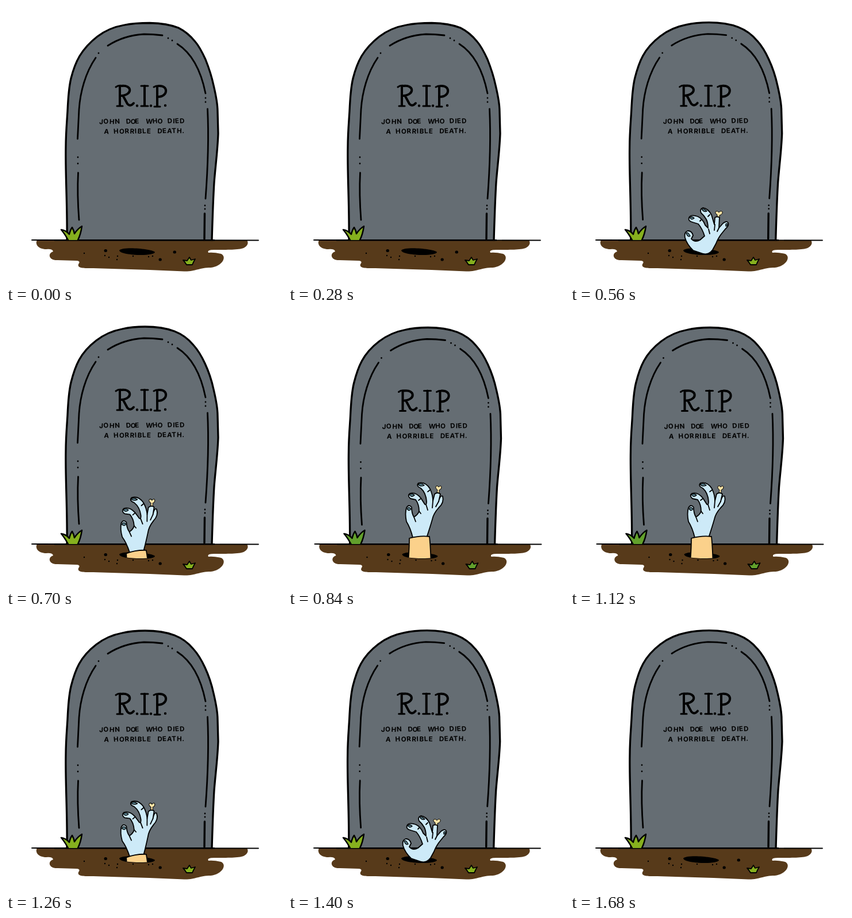
An HTML page for the animation above (1.82 s loop, 480 by 480 pixels).

```html
<!DOCTYPE html>
<html lang="en">
<head>
<meta charset="utf-8">
<title>Gravestone</title>
<style>
html, body { margin: 0; height: 100%; overflow: hidden; background: #fff; }
svg { display: block; width: 100vw; height: 100vh; }
.ink { fill: none; stroke: #000; stroke-width: 2.8; stroke-linecap: round; stroke-linejoin: round; }
.thin { stroke-width: 1.8; }
.dots { stroke-width: 2.8; }
#slab { fill: #656d73; stroke-width: 3.3; }
.skin { fill: #cdeaf8; }
.bone { fill: #fbe3a6; stroke-width: 1; }
.nail { fill: #5b8795; stroke-width: 1.3; }
text { font: 700 11.5px Inter, "Open Sans", sans-serif; }
</style>
</head>
<body>
<svg viewBox="0 0 480 480">
  <clipPath id="above"><path d="M0 0H480V427H259C257 435 199 433 197 425H0Z"/></clipPath>

  <g id="stone">
    <path id="slab" class="ink"/>
    <g class="ink">
      <path d="M156 90C138 116 129 150 127 180L124.5 231M125.5 290C124 318 125 346 127 372M177 69Q205 51 240 49Q256 49 272 51M298 66C323 82 339 112 347 152M350.5 179C353 232 351 282 347 335"/>
      <path d="M345.5 361L345 405" stroke-width="3.4"/>
      <path class="dots" d="M161 82l0 0M125 263l0 0M125 274l0 0M282 56l0 0M289 60l0 0M347 160l0 0M347 167l0 0M346 347l0 0M346 353l0 0"/>
    </g>
    <g class="ink" style="stroke-width:4">
      <path d="M198 140V173M201 139C219 137 221 154 201 156M204 157L211 170Q216 176 222 169M241 139V173M263 141V174M266 139C283 138 282 158 264 158"/>
      <path d="M228 173.5l0 0M252 173.5l0 0M277 173l0 0" stroke-width="4.4"/>
      <path d="M191 141Q196 137 203 139M193 174H203M235 139H247M235 174H247M257 141Q262 138 268 139M258 175H268" stroke-width="3"/>
    </g>
    <g transform="rotate(-.5 237 206)">
      <text y="204.5"><tspan x="162" letter-spacing="1.1" rotate="4 -5 3 -4">JOHN</tspan><tspan x="209" letter-spacing="-.8" rotate="-3 4 -3">DOE</tspan><tspan x="243" rotate="3 -4 2">WHO</tspan><tspan x="281" letter-spacing=".9" rotate="-4 2 -5 -2">DIED</tspan></text>
      <text y="221.5"><tspan x="170" rotate="4">A</tspan><tspan x="187" letter-spacing="1.1" rotate="-3 4 -4 3 -2 4 -3 2">HORRIBLE</tspan><tspan x="263" letter-spacing=".8" rotate="3 -4 3 -3 2 0">DEATH.</tspan></text>
    </g>
  </g>

  <g id="ground">
    <path fill="#573a1a" d="M54 407C50 414 56 423 70 423Q81 422 82 427C72 430 74 443 90 442L124 443Q130 444 126 449C123 457 139 456 152 456L250 459L310 461.5C329 462 336 455 356 455C376 453 385 436 374 431Q361 428 352 429Q349 424 362 424C385 424 405 424 413 421Q424 415 419 407Z"/>
    <path class="ink" style="stroke-width:1.8" d="M45 407L439 407.5"/>
    <path class="ink" style="stroke-width:2.6" d="M85 407.2L362 407.2"/>
    <path d="M197 425C202 418 253 422 259 428C258 436 198 434 197 425Z"/>
    <g class="ink" style="stroke-width:2.4">
      <path d="M136 430l0 0M172 434l0 0M179 437l0 0M194 435l0 0M193 441l0 0M221 435l0 0M248 436l0 0M255 435l0 0"/>
      <path style="stroke-width:5" d="M173 425.5l.5 0M268 441l.3 0"/>
      <path id="pebble" style="stroke-width:5" d="M293 428l.5 0"/>
    </g>
    <g id="grass" class="ink" style="stroke-width:2.5">
      <path d="M108 407Q102 396 96 389Q104 390 110 397Q112 389 115 385Q118 390 119 396Q125 387 132 383Q130 397 125 407"/>
      <path class="thin" d="M314 450Q311 445 308 442L315 443L319 437L322 442L329 440Q326 445 324 450Z"/>
    </g>
  </g>

  <g clip-path="url(#above)">
    <g id="low" class="ink thin">
      <path class="bone" d="M256 369L256 363Q251 360 254 357Q257 356 259 359Q262 355 265 358Q266 362 260 364L260 369Z"/>
      <path class="skin" d="M232 431L214 425Q203 414 200 403Q198 393 205 391Q212 391 214 399L211 405Q217 412 226 407L234 400Q230 387 223 379L213 376Q205 374 207 368Q210 362 222 366Q231 370 235 381L240 386Q240 377 237 371Q233 364 228 360Q225 353 231 351Q240 352 246 363L251 380L252 368Q256 365 260 368L259 386L266 378Q272 373 275 377Q277 382 270 388L262 398Q256 407 254 413L248 424Q241 433 232 431Z"/>
      <path d="M241 388L243 396M252 380L251 390M259 386L256 392M243 363L240 366M229 371L226 374"/>
      <path class="nail" d="M202 395Q205 392 209 400Q205 403 202 395ZM208 368Q213 365 216 369Q211 373 208 368ZM229 353Q234 352 238 357Q232 359 229 353ZM271 379Q275 377 274 381Q270 386 271 379Z"/>
    </g>
    <g id="high" class="ink thin">
      <path class="bone" d="M259 319L260 313Q255 309 258 306Q261 305 262 308Q266 304 267 308Q267 312 263 313L263 319Z"/>
      <path class="skin" d="M217 396Q213 379 206 368Q203 354 206 344Q210 337 215 343Q215 354 219 360Q226 356 228 350Q228 338 222 330L213 328Q207 323 212 319Q222 316 231 327L238 338Q241 340 241 333Q240 318 231 310Q222 306 227 301Q239 298 247 311Q252 322 252 332L255 320Q260 316 265 320L262 333Q265 321 269 324Q272 335 262 344Q253 354 251 364Q247 378 241 396Z"/>
      <path d="M240 338L243 348M252 332L251 344M228 350L231 354M262 333L257 342M219 360L222 368M247 313L243 316M231 328L227 331"/>
      <path class="nail" d="M207 346Q210 341 214 346Q211 351 207 346ZM211 321Q216 318 220 322Q215 327 211 321ZM226 303Q232 300 237 305Q230 308 226 303Z"/>
      <path fill="#fbd18b" d="M211 397Q229 392 246 394Q248 412 249 450H208Q211 420 211 397Z"/>
    </g>
  </g>
</svg>
<script>
const $ = id => document.getElementById(id);
const STEP = 140;
const order = [0, 1, 0, 2, 3, 4, 5, 6, 5, 4, 3, 2, 1];

// two slightly different drawings of the slab: only the crown changes
const slab = crown => "M106 408C107 350 103 290 104 245C104 222 106 200 107 183C108 160 109 143 113 126"
  + crown + "C353 108 358 124 361 138C365 155 368 168 368 183L369 222C368 252 364 280 362 307C360 340 359 375 358 408";
const slabs = [
  slab("C117 110 121 99 128 87C136 74 146 63 159 53C172 43 189 36 206 33C221 30 235 29.5 250 29.5C268 30 285 32 300 38C312 44 321 52 329 62C337 71 342 82 347 93"),
  slab("C117 110 121 98 127 87C134 74 144 63 157 53C170 43 186 36 202 33C215 30 228 29 242 29C260 29 277 31 293 37C306 42 317 50 326 61C335 71 341 82 346 93")
];

const OLIVE = "#86b01e", GREEN = "#62a02c";

// slab drawing, stone offset, ground offset, grass colour, hand transform
const poses = [
  { slab: 0, stone: [0, 0], ground: 0, grass: OLIVE },
  { slab: 1, stone: [0, -.3], ground: 0, grass: OLIVE },
  { slab: 1, stone: [0, -.3], ground: 0, grass: OLIVE, low: "translate(-1 40)" },
  { slab: 1, stone: [-.3, -.3], ground: 0, grass: OLIVE, low: "" },
  { slab: 1, stone: [0, 0], ground: 0, grass: OLIVE, high: "translate(-1 25) rotate(-4 229 410)" },
  { slab: 1, stone: [1.5, 1.5], ground: 1.5, grass: GREEN, high: "" },
  { slab: 1, stone: [1, 2], ground: 1, grass: GREEN, high: "translate(0 -2) rotate(2 229 425)" }
];

function show(id, transform) {
  const visible = transform !== undefined;
  $(id).style.display = visible ? "" : "none";
  if (visible) $(id).setAttribute("transform", transform);
}

function draw() {
  const pose = poses[order[Math.floor(performance.now() / STEP) % order.length]];
  const hand = pose.low ?? pose.high;
  $("slab").setAttribute("d", slabs[pose.slab]);
  $("grass").style.fill = pose.grass;
  show("stone", `translate(${pose.stone})`);
  show("ground", `translate(${pose.ground} 0)`);
  show("low", pose.low);
  show("high", pose.high);
  show("pebble", hand === undefined ? "" : undefined);
  requestAnimationFrame(draw);
}
draw();
</script>
</body>
</html>
```
